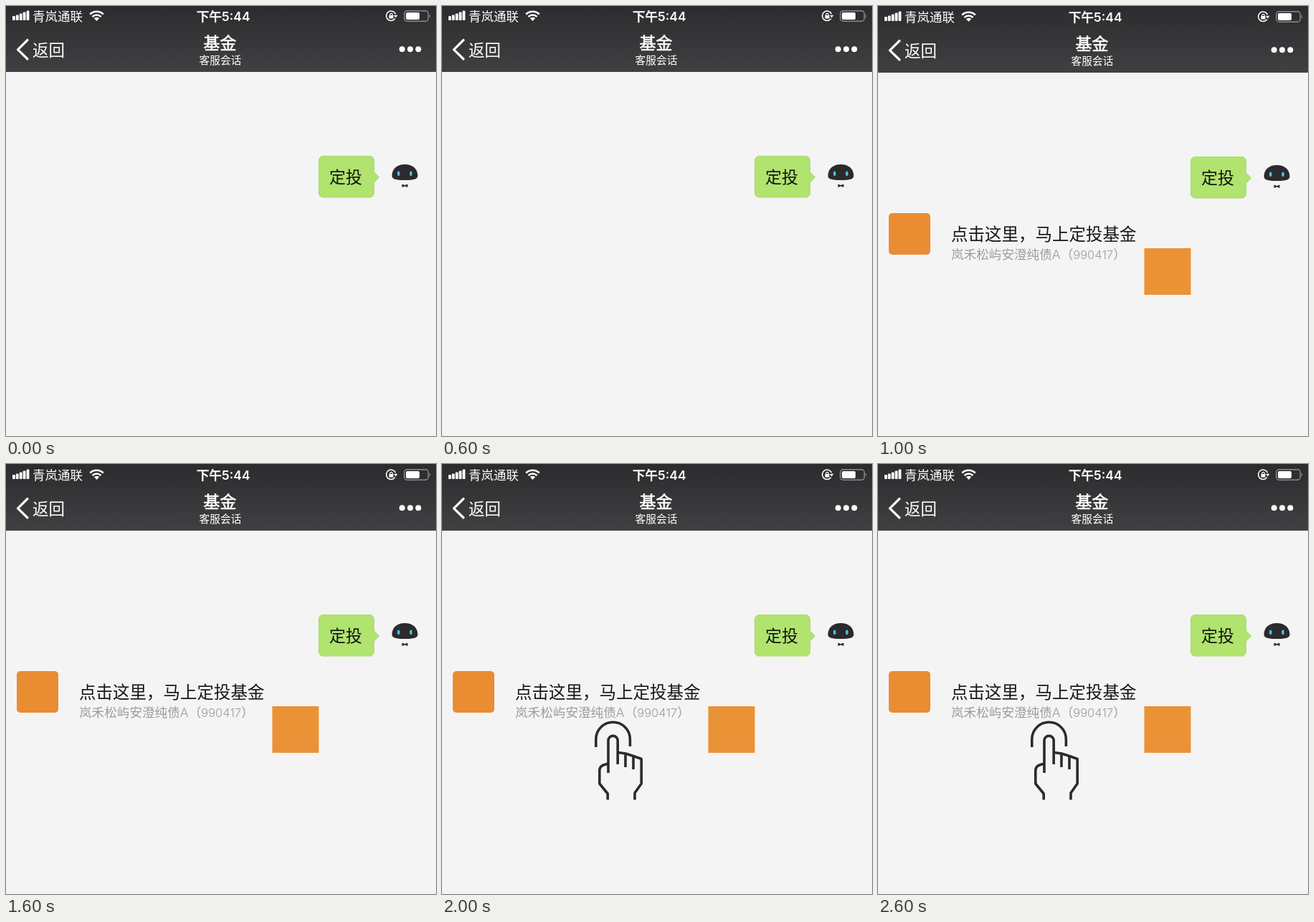
An HTML page for the animation above (3 s loop, 600 by 600 pixels).

```html
<!DOCTYPE html>
<html lang="zh-CN">
<head>
<meta charset="utf-8">
<title>基金客服会话</title>
<style>
  html, body { margin: 0; width: 100%; height: 100%; overflow: hidden; background: #f4f4f4; }
  svg { display: block; width: 600px; height: 600px; }
  text { font-family: "Noto Sans CJK SC", "Noto Sans CJK", sans-serif; }
  .latin { font-family: Inter, sans-serif; }
  .mid { text-anchor: middle; }
  .medium { stroke: #fff; stroke-width: .7; }
  .line { fill: none; stroke-linecap: round; stroke-linejoin: round; }
  .butt { stroke-linecap: butt; }

  .screen, .reply, .tap { animation: 3s step-end infinite; }
  .screen { animation-name: nudge; }
  .reply { animation-name: reply; }
  .tap { animation-name: tap; }
  @keyframes nudge {
    0% { transform: translateY(0); }
    33.3333%, 100% { transform: translateY(1px); }
  }
  @keyframes reply {
    0% { visibility: hidden; }
    33.3333%, 100% { visibility: visible; }
  }
  @keyframes tap {
    0% { visibility: hidden; }
    66.6667%, 100% { visibility: visible; }
  }
</style>
</head>
<body>
<svg viewBox="0 0 600 600">
  <defs>
    <linearGradient id="bar" x2="0" y2="1">
      <stop offset="0" stop-color="#2c2b2e"/>
      <stop offset="1" stop-color="#403f42"/>
    </linearGradient>
  </defs>
  <rect width="600" height="600" fill="#f4f4f4"/>

  <g class="screen">
    <rect y="-1" width="600" height="93" fill="url(#bar)"/>

    <!-- status bar -->
    <g fill="#fff">
      <rect x="9" y="14" width="3.8" height="6" rx="1"/>
      <rect x="13.9" y="12.5" width="3.8" height="7.5" rx="1"/>
      <rect x="18.8" y="10.5" width="3.8" height="9.5" rx="1"/>
      <rect x="23.7" y="8.5" width="3.8" height="11.5" rx="1"/>
      <rect x="28.6" y="6.5" width="3.8" height="13.5" rx="1"/>
      <text x="37" y="21" font-size="17.5">青岚通联</text>
      <path d="M126.5 21 l-3.6 -3.7 a5.2 5.2 0 0 1 7.2 0 z"/>
      <text x="266" y="21" font-size="17.5"><tspan class="medium">下午</tspan><tspan class="latin" font-weight="600">5:44</tspan></text>
    </g>
    <g class="line butt" stroke="#fff" stroke-width="2.5">
      <path d="M117.2 11.5 a13.3 13.3 0 0 1 18.6 0"/>
      <path d="M120.5 15 a8.6 8.6 0 0 1 12 0"/>
    </g>
    <path class="line" d="M543.2 10.5 A6.7 6.7 0 1 0 542.5 18" stroke="#fff" stroke-width="1.6"/>
    <path d="M541 12.8 h5.4 l-2.7 3.6 z" fill="#fff"/>
    <rect x="534.5" y="13" width="6" height="4.6" rx=".6" fill="#fff"/>
    <path class="line" d="M535.8 13 v-1 a1.7 1.7 0 0 1 3.4 0 v1" stroke="#fff" stroke-width="1.2"/>
    <rect x="555.7" y="6.7" width="33.6" height="14.6" rx="4" fill="none" stroke="#8c8c8e" stroke-width="1.4"/>
    <rect x="558" y="9" width="19" height="10" rx="2" fill="#fff"/>
    <path d="M590.8 11.5 a3 3 0 0 1 0 5 z" fill="#8c8c8e"/>

    <!-- title bar -->
    <path class="line" d="M30 47.500 L16.500 60.800 L30 74" stroke="#fff" stroke-width="3.2"/>
    <g fill="#fff">
      <text x="37" y="69.5" font-size="22.5">返回</text>
      <text class="mid medium" x="298.5" y="59.8" font-size="23">基金</text>
      <text class="mid" x="299" y="80.5" font-size="14.7">客服会话</text>
      <circle cx="552.7" cy="60.2" r="4"/>
      <circle cx="564" cy="60.2" r="4"/>
      <circle cx="575.3" cy="60.2" r="4"/>
    </g>

    <!-- sent message -->
    <path d="M442.5 209.5 H507.5 a6 6 0 0 1 6 6 V231.5 L520.5 239 L513.5 246.5 V261 a6 6 0 0 1 -6 6 H442.5 a6 6 0 0 1 -6 -6 V215.5 a6 6 0 0 1 6 -6 z"
          fill="#b0e46e" stroke="#a8d873"/>
    <text x="451" y="246.7" font-size="23" fill="#111">定投</text>

    <!-- robot -->
    <path d="M538.5 237 C538.5 227 546 221 556.5 221 C567 221 574.5 227 574.5 237 C574.5 241.5 569 243 556.5 243 C544 243 538.5 241.5 538.5 237 z" fill="#2b2a2c"/>
    <g fill="#4fc3d9">
      <ellipse cx="547.8" cy="233.8" rx="1.8" ry="3.4"/>
      <ellipse cx="565" cy="233.8" rx="1.8" ry="3.4"/>
    </g>
    <path d="M552.5 248.5 L556.5 250 L560.5 248.5 V253 L556.5 251.5 L552.5 253 z" fill="#2b2a2c"/>
  </g>

  <g class="reply">
    <rect x="15" y="289" width="58" height="58" rx="5" fill="#ea8c32"/>
    <text x="102" y="326.5" font-size="23.5" fill="#161616">点击这里，马上定投基金</text>
    <text x="102" y="353" font-size="17.6" font-weight="300" fill="#9c9c9c">岚禾松屿安澄纯债<tspan class="latin">A</tspan>（<tspan class="latin" font-size="16.5">990417</tspan>）</text>
    <rect x="371.5" y="338" width="65" height="65" fill="#ea9236"/>
  </g>

  <!-- tapping hand -->
  <g class="tap line butt" stroke="#2b2b2d" stroke-width="3.6">
    <path d="M214.8 395 V384 a23.8 23.8 0 0 1 47.6 0 V394"/>
    <path d="M232 431 V386 a6.6 6.6 0 0 1 13.2 0 V419"/>
    <path d="M245.2 402.5 L256 404 L267 407.5 L278.2 411.5 V446 L269 459 V468.5"/>
    <path d="M256 404 V423 M267 407.5 V426"/>
    <path d="M232 418 L225.5 420 Q219.8 422 219.8 428 V446 L231.2 460 V468.5"/>
  </g>
</svg>
</body>
</html>
```
